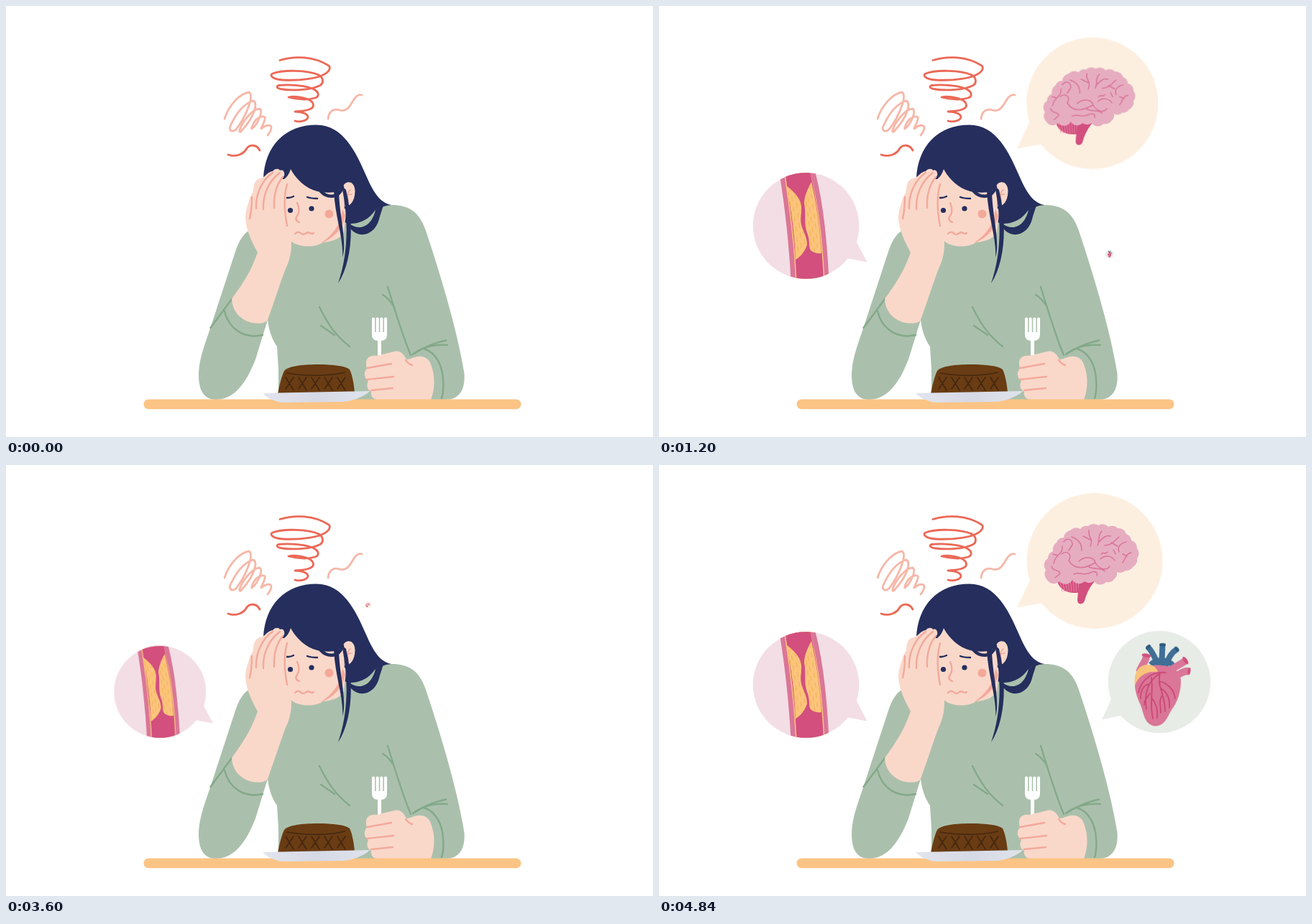
An HTML page that plays this animation: 900x600 px, repeating every 6000 ms.

```html
<!DOCTYPE html>
<html lang="en">
<head>
<meta charset="utf-8">
<title>Headache at the table</title>
<style>
html, body { margin: 0; width: 100%; height: 100%; overflow: hidden; background: #fff; }
svg { display: block; width: 100%; height: 100%; }
.line { fill: none; stroke-width: 2.4; stroke-linecap: round; stroke-linejoin: round; }
.thin { stroke-width: 1.7; }
.tube { stroke-linecap: butt; }
.green { fill: #abc0ac; }
.navy { fill: #252e5d; }
.skin { fill: #f9d8ca; }
.fold { stroke: #83a98a; }
.crease { stroke: #f3a99a; }
.cocoa { stroke: #452711; }
.red { stroke: #eb6957; stroke-width: 2.8; }
.pale { stroke: #f6b7a8; stroke-width: 2.8; }
.rose { fill: #da7697; }
.wine { fill: #d24f7e; }
.fat { fill: #fbc47c; }
.bubble { transform: scale(0); }
</style>
</head>
<body>
<svg viewBox="0 0 900 600">
  <defs>
    <linearGradient id="china"><stop offset="0" stop-color="#e2e5ee"/><stop offset=".5" stop-color="#d6d9e6"/><stop offset="1" stop-color="#dfe3eb"/></linearGradient>
    <clipPath id="lens"><circle cx="204.5" cy="306" r="73.8"/></clipPath>
    <clipPath id="plaque">
      <path id="fatL" d="M176.500 250C184 255 194 264 197 274C200 285 196 293 197.500 302C199 312 206 320 206 332C203 342 196 350 190 353C189 320 184 280 176.500 250Z"/>
      <path id="fatR" d="M212 245C206 256 202 266 202 275C205 290 201 303 206 316C211 327 207 337 212 341C216 344 222 345 226 344C224 310 219 275 212 245Z"/>
    </clipPath>
  </defs>

  <!-- body -->
  <path class="green" d="M342 311C332 314 324 325 318 345L284 449C277 470 268 492 268 514C268 536 276 548 292 548C322 548 338 515 347 492L364 437C366 455 372 467 377 474L379 506V548H612C630 548 639 535 637.500 512C628 450 600 360 583 310C574 286 560 276 532 277L470 290L400 315Z"/>
  <g class="line fold">
    <path d="M436 419C448 444 460 460 478 474M438 445L457 458M531 391C541 424 552 460 563 486M524 402C531 406 535 411 540 419"/>
    <path d="M566 485C580 476 592 470 612 465.500M566 485C580 474 598 471 614 472M581 477C598 482 607 500 608 520C609 533 608 540 606 546"/>
    <path d="M304 425C310 450 332 464 357 458M314 408L284.500 448"/>
  </g>

  <!-- hair and face -->
  <path class="navy" d="M358 240C360 195 388 165.500 432 165.500C469 165.500 487 204 500 234C510 257 519 274 536 277C526 278 519 281 513 285C505 297 492 303 479 303L465 300L440 270L385 260Z"/>
  <path class="navy" d="M477 307C488 325 514 322 520 293C522 287 523 283 525 278L514 284C508 309 490 313 478 303Z"/>
  <path class="skin" d="M441 329C455 328 466 323 470 315L474 280L450 300Z"/>
  <path class="skin" d="M380 241H387C392 237 394 233 396 227C402 239 417 256 438 259C447 260 455 260 462 258L470 250L471 288C467 310 455 322 441 329C430 337 405 337 394 325Z"/>
  <path d="M438 330C454 319 463 306 466 294L468 283L472 292C467 312 455 324 438 330Z" fill="#f3a99a"/>
  <path class="skin" d="M469 251C472 243 485 242 485.500 258C485 272 479 279 471 279Z"/>
  <circle cx="449.5" cy="289.5" r="6" fill="#f3a99a"/>
  <path class="line thin crease" d="M474 263L481 262M479 256C475 258 474 265 476 271"/>
  <path class="line crease" d="M405 274C408 281 408 288 405 292C402 296 403 299 408 301M402 317C405 314 408 314 411 317C414 320 417 316 420 315C423 315 424 319 428 316"/>
  <path class="line" stroke="#252e5d" d="M389 267H393C396 267 398 266 400 265M419 266C424 268 428 268 433 268"/>
  <g class="navy"><circle cx="395.5" cy="284.500" r="3.6"/><circle cx="425" cy="282" r="3.6"/></g>
  <path class="line" stroke="#252e5d" style="stroke-width:4.5" d="M438 258C446 267 463 269 468 252"/>
  <path class="navy" d="M456 258C458 295 470 325 468 350C475 328 463 290 463 256ZM467 250C477 300 476 345 462 386C481 357 485 305 473 256Z"/>

  <!-- raised hand -->
  <path class="skin" d="M350 343C340 325 334 310 333 296C333 283 337 276 339 268C341 262 343 263 344 255C345 243 349 241 357 239C362 236 364 231 371 230C374 226 380 226 381 229C386 227 388 232 387 236L384 241C389 244 391 250 390 262V304C394 310 397 320 397 332C397 345 393 358 388 368C380 390 373 412 364 437C360 443 345 443 336 439C324 434 315 424 314 408C328 388 340 372 350 343Z"/>
  <path class="line crease" d="M342 266C342 278 341 288 339 296M371 232C356 242 347 262 348 282M381 232C366 243 357 262 358 283M385 238C376 249 372 262 373 281M391 248C386 265 387 285 391 306"/>

  <!-- fork and hand -->
  <g fill="#fff">
    <path d="M509 454H530V457C530 463 527 466 521 466H518C512 466 509 463 509 457Z"/>
    <rect x="517" y="460" width="5" height="28"/>
    <g id="tines"></g>
  </g>
  <path class="skin" d="M501 499C500 489 507 486 515 487L540 481C549 479 553 485 557 492C563 492 568 488 573 488C582 487 588 491 591 499C597 515 597 532 591 548H517C510 548 507 542 508 537C502 534 501 528 504 522C498 518 497 510 502 505Z"/>
  <path class="line crease" d="M503 504L536 498M502 520L539 516M508 535L538 532M556 493C559 497 561 499 565 500"/>

  <!-- table and cake -->
  <rect x="191.5" y="547.5" width="525" height="13.7" rx="6.8" fill="#fbc485"/>
  <path fill="#693c13" d="M378 540C380 528 384 514 387 508C393 500 420 499 434 499C455 499 472 501 478 506C482 514 484 528 485 538Z"/>
  <path class="line thin cocoa" d="M391 511C420 516 453 515 471 510"/>
  <path id="lattice" class="line thin cocoa"/>
  <path fill="url(#china)" d="M357 539L506 536C500 543 481 551 466 551L384 552C372 550 364 546 357 539Z"/>

  <!-- scribbles -->
  <path class="line red" d="M381 75.500C402 69 428 70 448 82.500C451 84 451 87 449 90C440 102 405 104 385 103C370 102 366 96 371 94C385 88.500 420 89 435 96C443 101 441 108 437 110.500C425 117 400 118 385 116C377 115 375 112 379 110.500C392 109 420 110 430 117C437 122 434 127 430 128C420 131 405 130 393 127C400 125 420 127 426 134C432 143 420 146 402 147C412 147 420 150 420 155C419 160 408 162 402 160"/>
  <path class="line pale" d="M304 157C310 138 325 122 338 120C346 125 333 155 320 172C313 177 309 172 313 165C320 150 330 137 343 132C352 133 345 155 329 172C326 177 323 176 326 170C330 160 343 143 353 143C359 147 348 167 343 170C340 174 342 165 348 158C356 152 362 153 360 158C358 166 354 170 355 171C360 166 368 164 369 169C369 174 366 177 364 180M448 157C449 147 455 142 464 145C474 148 478 140 484 130C488 124 492 123 495 124"/>
  <path class="line red" d="M309 207C320 211 331 206 335 198C340 192 349 193 353 201"/>

  <!-- artery -->
  <g id="artery" class="bubble">
    <path fill="#f3dee5" d="M274 327L289.500 356.500L260 351Z"/>
    <circle cx="204.5" cy="306" r="73.8" fill="#f3dee5"/>
    <g clip-path="url(#lens)">
      <path class="rose" d="M167 230C176 285 181 335 183.500 382H236.500C234 330 229 275 217 230Z"/>
      <path class="fat" d="M173.500 230C182 285 188 335 190 382H230.500C228 330 223 280 210 230Z"/>
      <path class="wine" d="M175 230C183.500 285 189.500 335 191.500 382H229C226.500 330 221.500 280 210 230Z"/>
      <use href="#fatL" class="fat"/><use href="#fatR" class="fat"/>
      <path id="streaks" class="line" clip-path="url(#plaque)" stroke="#f5b355" style="stroke-width:1.2" stroke-dasharray="6 8"/>
    </g>
  </g>

  <!-- brain -->
  <g id="brain" class="bubble">
    <path fill="#fdefe0" d="M517 158L498 198.500L534 192Z"/>
    <circle cx="606" cy="133.5" r="94.4" fill="#fdefe0"/>
    <path class="wine" d="M554 160C555 174 572 181 588 177L600 158Z"/>
    <path id="ridges" class="line" stroke="#e88bab" style="stroke-width:.9"/>
    <path class="wine" d="M608 160C600 168 595 178 592 189C590 195 582 195 582 188C583 178 583 170 586 158Z"/>
    <path id="cortex" fill="#e6adc0"/>
    <path class="line" stroke="#d9749a" style="stroke-width:1.5" d="M549 137C552 122 562 126 561 113M555 126L548 124M563 107C567 101 575 102 575 111M575 111L570 119M574 100C584 104 588 109 588 119M598 91C596 101 605 101 600 113M600 104L590 99M616 92C609 99 614 105 610 112M612 107C618 101 622 97 628 99M640 100C634 105 630 112 620 112M629 108L638 113M650 107C642 109 637 114 640 121M657 122C650 123 649 130 645 136M651 127L645 124M615 124C619 120 620 126 624 121M584 134C592 126 606 128 607 136C612 145 622 148 627 141M570 133C580 149 596 142 607 136M560 124C568 118 575 125 570 133M577 152C585 148 590 155 600 150C606 147 611 149 609 154M546 141C549 150 556 144 558 151L551 157M614 131C620 125 630 126 634 133M598 142C607 146 615 142 620 148M635 124L632 118"/>
  </g>

  <!-- heart -->
  <g id="heart" class="bubble">
    <path fill="#e7ece6" d="M630 324L616 354.500L646 348Z"/>
    <circle cx="696" cy="302" r="71.3" fill="#e7ece6"/>
    <g class="line tube" stroke="#3f6f96" style="stroke-width:8">
      <path d="M680 253C688 261 690 270 696 281M700.500 250L699 282M721 256C711 262 709 270 704 281"/>
      <path d="M684 278C692 270 708 270 715 279"/>
    </g>
    <g fill="#2c5a80"><ellipse cx="680.5" cy="253" rx="4" ry="2.3" transform="rotate(-42 680.5 253)"/><ellipse cx="700.5" cy="250" rx="4.5" ry="2.3"/><ellipse cx="720.5" cy="256" rx="4" ry="2.3" transform="rotate(50 720.5 256)"/></g>
    <path class="line tube" stroke="#da7697" style="stroke-width:10" d="M678 265C678 274 672 276 668 288M733 272C725 278 720 279 708 288M737 287C730 286 726 290 715 296"/>
    <g class="wine"><ellipse cx="678" cy="265" rx="6.5" ry="2.5" transform="rotate(8 678 265)"/><ellipse cx="732.5" cy="272" rx="2.5" ry="6" transform="rotate(-35 732.5 272)"/><ellipse cx="737.5" cy="287" rx="2" ry="5" transform="rotate(8 737.5 287)"/></g>
    <path class="rose" d="M663 296C660 308 664 322 669 332C675 345 674 361 690 363.500C705 363 707 350 713 341C722 330 727 312 726 298C724 286 713 279 700 279C685 277 667 283 663 296Z"/>
    <path class="fat" d="M662 307C660 290 666 278 680 278C687 278 692 281 694 288C680 286 667 292 662 307Z"/>
    <path class="line thin" stroke="#cb4575" d="M705 289C688 287 671 297 667 317M697 290C682 299 674 314 678 340M685 296C688 315 682 330 687 353M681 305C674 307 670 314 670 325M683 318C678 325 675 327 675 334M686 325C691 332 694 338 693 352M697 290C692 307 704 318 704 343M698 311C707 316 711 325 710 338M696 301C706 303 717 312 718 325M700 321C695 327 698 335 698 345"/>
  </g>
</svg>
<script>
const $ = id => document.getElementById(id);
const steps = n => [...Array(n).keys()];

$("tines").innerHTML = steps(4)
  .map(i => `<rect x="${509 + i * 5.65}" y="433.5" width="4.1" height="22" rx="2"/>`).join("");

$("lattice").setAttribute("d", steps(5).map(i => {
  const x = 389 + i * 18;
  return `M${x} 517L${x + 11} 535M${x + 11} 517L${x} 533`;
}).join(""));

// Dashes that follow the vessel walls
$("streaks").setAttribute("d", steps(12).map(i => {
  const x = 166 + i * 4.5, y = 240 - i * 5 % 13;
  return `M${x} ${y}C${x + 8} ${y + 40} ${x + 13} ${y + 80} ${x + 15} ${y + 120}`;
}).join(""));

$("ridges").setAttribute("d", steps(9).map(i =>
  `M${557 + i * 3.8} 162Q${560 + i * 3.4} 169 ${561 + i * 3.2} 176`).join(""));

const rim = "538,146 541,130 548,120 553,108 563,101 572,91 586,89 597,85 611,84 625,86 638,88 650,96 657,105 665,116 665,130 659,142 649,147 637,149 633,159 622,163 605,162 592,162 575,160 557,162 540,160".split(" ");
$("cortex").setAttribute("d", `M${rim[0]}` + [...rim.slice(1), rim[0]].map(p => `A11 11 0 0 1 ${p}`).join("") + "Z");

// Each bubble: id, anchor, start and end of its growth in ms
const LOOP = 3000;
const bubbles = [
  ["artery", "278px 380px", 0, 790],
  ["brain", "498px 198px", 485, 1290],
  ["heart", "621px 349px", 1054, 1860]
];
for (const [id, anchor, from, to] of bubbles) {
  const el = $(id);
  el.style.transformOrigin = anchor;
  el.animate([
    { transform: "scale(0)", offset: 0 },
    { transform: "scale(0)", offset: from / LOOP, easing: "cubic-bezier(.37,0,.63,1)" },
    { transform: "scale(1)", offset: to / LOOP },
    { transform: "scale(1)", offset: 1 }
  ], { duration: LOOP, iterations: Infinity });
}
</script>
</body>
</html>
```
